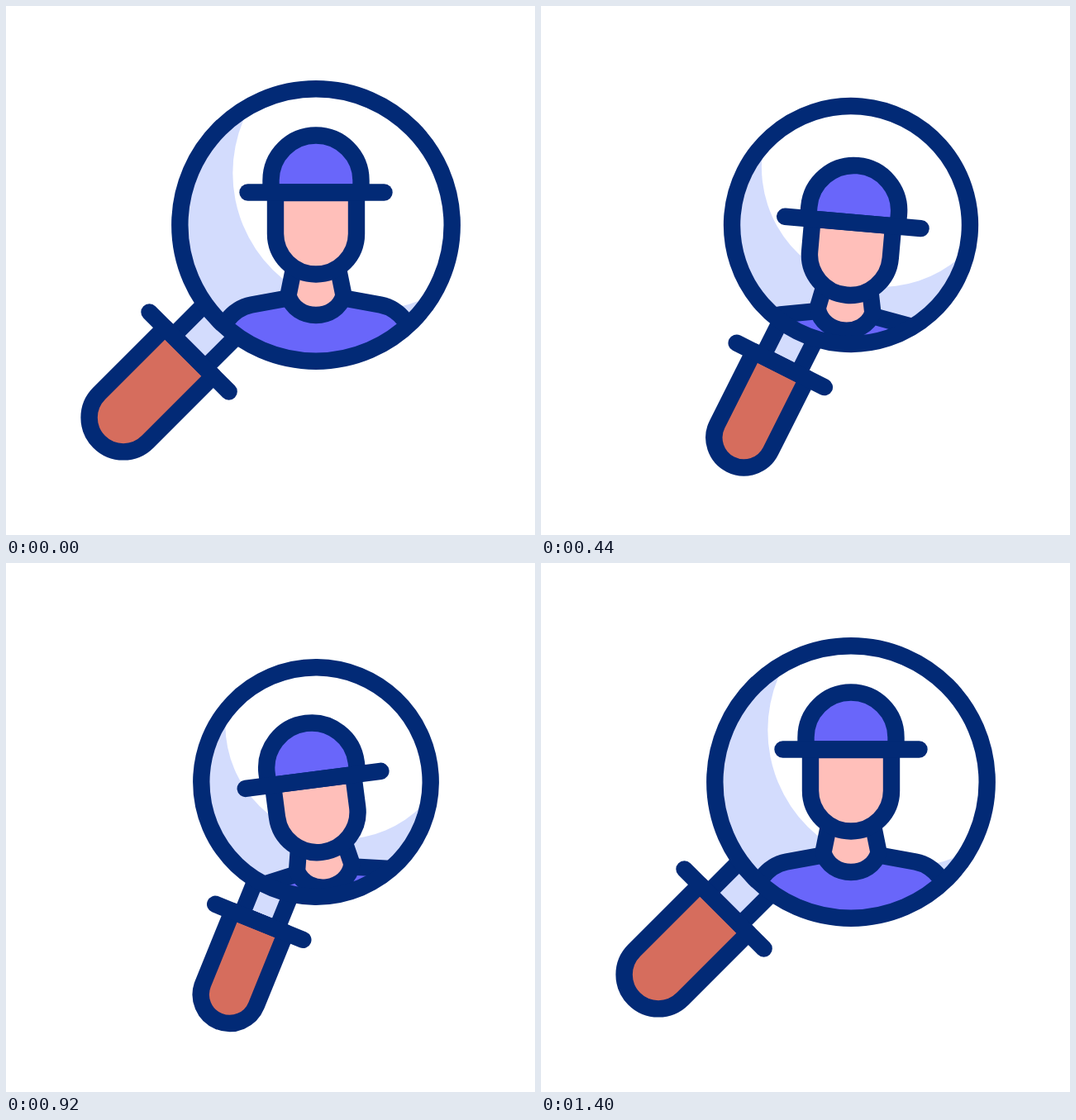
An HTML page that plays this animation: 640 px wide and 640 px high, repeating every 1.48 s.

```html
<!DOCTYPE html>
<html lang="en">
<head>
<meta charset="utf-8">
<title>Search for a person</title>
<style>
  html, body { margin: 0; width: 100%; height: 100%; overflow: hidden; background: #fff; }
  svg { display: block; width: 100vw; height: 100vh; }
  .line, .line * {
    stroke: #022a76; stroke-width: 20.4; stroke-linecap: round; stroke-linejoin: round;
    vector-effect: non-scaling-stroke;
  }
  .none { fill: none; }
  .glass { fill: #d3dcfd; }
  .shine { fill: #fff; }
  .grip { fill: #d66d5d; }
  .cloth { fill: #6966fa; }
  .skin { fill: #ffbfba; }
</style>
</head>
<body>
<svg viewBox="0 0 640 640">
  <defs>
    <clipPath id="lens"><circle id="hole" cx="375" cy="265" r="164"/></clipPath>
  </defs>

  <!-- handle hangs straight down from the lens centre -->
  <g class="tool">
    <g class="line">
      <path class="glass" d="M-27.3 160V217H27.3V160"/>
      <path class="grip" d="M-41.4 217V329.5A41.4 41.4 0 0 0 41.4 329.5V217Z"/>
      <path d="M-68 217H68"/>
    </g>
    <circle class="glass" r="164"/>
  </g>

  <g clip-path="url(#lens)">
    <g class="tool"><circle class="shine" cx="1.5" cy="-90.3" r="165.6"/></g>
    <g id="person" class="line">
      <path class="cloth" d="M341 353.5L297 361.5Q279 365 267 381L235 480H515L483 381Q471 365 453 361.5L409 353.5Z"/>
      <path class="skin" d="M348 318L341.500 350C350 382 400 382 408.500 350L402 318"/>
      <path id="face" class="skin" d="M326 226V275.500A49 49 0 0 0 424 275.500V226Z"/>
      <g id="hat">
        <path class="cloth" d="M320.500 225.500V211A54.500 54.500 0 0 1 429.500 211V225.500Z"/>
        <path d="M292.500 225.500H457.500"/>
      </g>
    </g>
  </g>

  <g class="tool line"><circle class="none" r="164.700"/></g>
</svg>
<script>
  const LOOP = 1480, STEP = 40;
  const $ = id => document.getElementById(id);
  const tools = document.querySelectorAll('.tool');
  const move = (el, value) => el.setAttribute('transform', value);

  // cubic ease in and out, from 0 at a to 1 at b
  function ease(t, a, b) {
    const u = Math.min(1, Math.max(0, (t - a) / (b - a)));
    return u < 0.5 ? 4 * u ** 3 : 1 - 4 * (1 - u) ** 3;
  }

  function draw(t) {
    const swing = ease(t, 15, 738) * (1 - ease(t, 722, 1403));
    const scale = 1 - 0.175 * swing;
    tools.forEach(el => move(el, `translate(375 265) rotate(${45 - 25.4 * swing}) scale(${scale})`));
    $('hole').setAttribute('r', 164 * scale);

    const duck = ease(t, 0, 725) * (1 - ease(t, 630, 1375));
    const tilt = 5 * ease(t, 15, 465) - 12.5 * ease(t, 465, 835) + 7.5 * ease(t, 822, 1408);
    move($('person'), `translate(0 ${25 * duck}) rotate(${tilt} 375 270)`);
    move($('face'), `translate(0 ${8.7 * duck})`);
    move($('hat'), `translate(0 ${23 * duck})`);
  }

  function tick() {
    const t = performance.now() % LOOP;
    draw(Math.floor(t / STEP) * STEP);
    requestAnimationFrame(tick);
  }
  tick();
</script>
</body>
</html>
```
